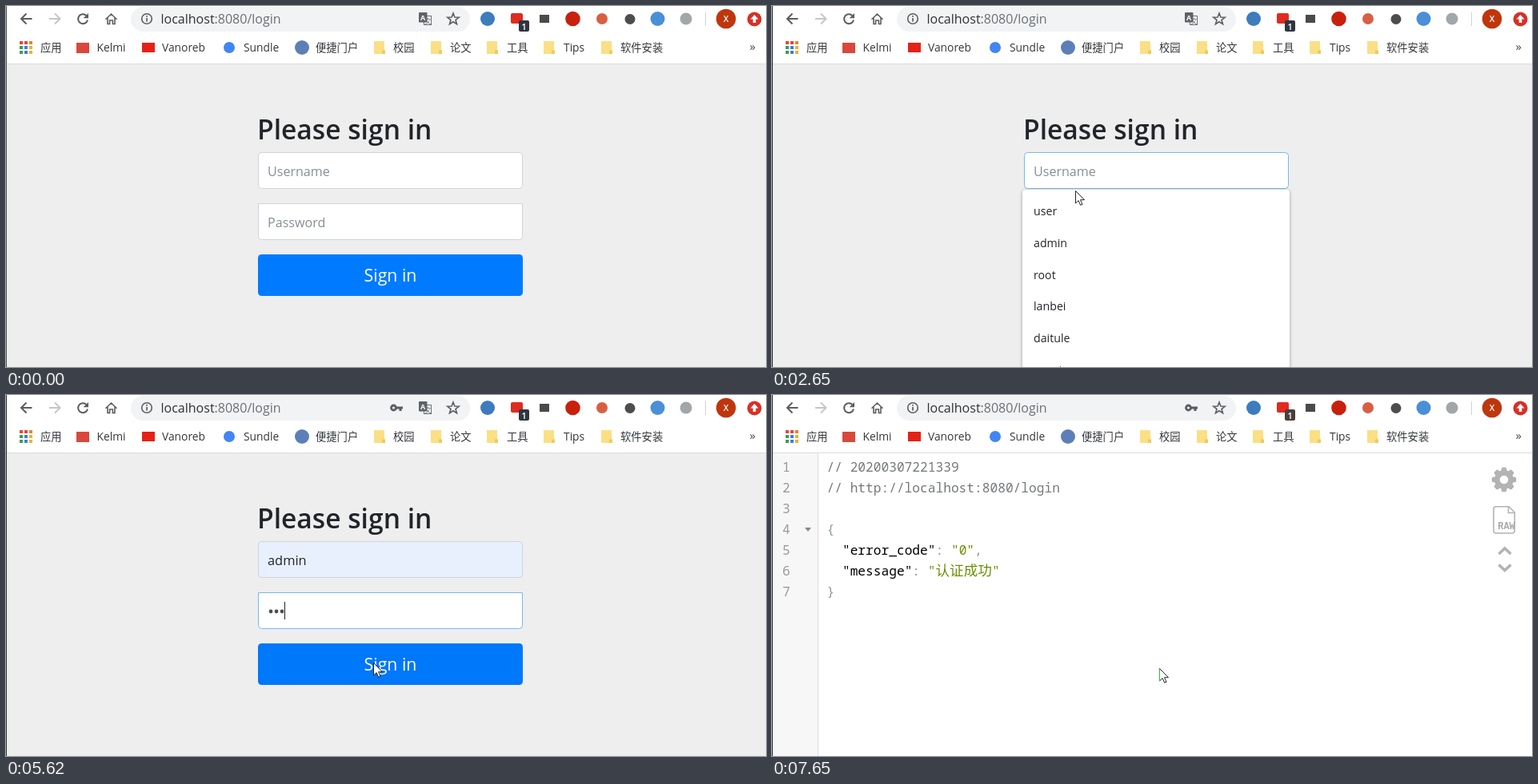
Recreate the animation shown at these times as an HTML page. Size 950 by 452 pixels, loop 8000 ms.

```html
<!DOCTYPE html>
<html lang="zh-CN">
<head>
<meta charset="utf-8">
<title>Sign in</title>
<style>
html, body { margin: 0; width: 100%; height: 100%; overflow: hidden; background: #fff; }
svg { display: block; }
text { font-family: "Open Sans", "Noto Sans CJK SC", "Noto Sans CJK JP", sans-serif; white-space: pre; }
.icon { fill: none; stroke: #5a5e63; stroke-width: 2; }
.thin { stroke-width: 1.6; }
.cjk { font-size: 13.3px; fill: #33363a; }
.mark { font-size: 13.8px; fill: #33363a; }
.hint { font-size: 16.1px; fill: #868e96; }
.item { font-size: 14.2px; fill: #212529; }
.code { font: 16.2px "Noto Sans Mono", "DejaVu Sans Mono", "Noto Sans CJK SC", monospace; }
.caret { fill: #222; }
#list { filter: drop-shadow(0 1px 2px rgba(0,0,0,.35)); }
</style>
</head>
<body>
<svg id="stage" width="950" height="452" viewBox="0 0 950 452">
  <rect width="950" height="452" fill="#fff"/>

  <g id="form">
    <rect y="73" width="950" height="379" fill="#eee"/>
    <text x="314" y="167" font-size="33.6" font-weight="600" fill="#212529">Please sign in</text>
    <rect id="userBox" x="315.5" y="183.5" width="330" height="45" rx="4"/>
    <text id="userHint" class="hint" x="327" y="213">Username</text>
    <text id="preview" x="327" y="213" font-size="14.7" fill="#222" style="font-family:'Liberation Sans',sans-serif"></text>
    <text id="userText" x="327" y="213" font-size="16.4" fill="#212529">admin</text>
    <rect id="userCaret" class="caret" x="327" y="195" width="1" height="22"/>
    <path id="passBox" d="M315.5 247.5H645.5V288.5a4 4 0 0 1-4 4H319.5a4 4 0 0 1-4-4z" fill="#fff"/>
    <text id="passHint" class="hint" x="327" y="277">Password</text>
    <g id="dots" fill="#495057"></g>
    <rect id="passCaret" class="caret" y="259" width="1" height="22"/>
    <rect id="ring" x="311.8" y="307.8" width="337.4" height="58.4" rx="7" fill="#007bff"/>
    <rect id="button" x="315" y="311" width="331" height="52" rx="4.5"/>
    <text x="480.5" y="345" font-size="21.3" fill="#fff" text-anchor="middle">Sign in</text>
    <g id="list">
      <path d="M313 460V234a4 4 0 0 1 4-4H643a4 4 0 0 1 4 4V460z" fill="#fff"/>
      <rect id="hover" x="314" width="333" height="40" fill="#dadce0"/>
      <g id="items"></g>
    </g>
    <g id="tip">
      <rect x="414.5" y="283.5" width="110" height="28" fill="#fff" stroke="#5a5555"/>
      <text x="422" y="303" font-size="13" fill="#000">请填写此字段。</text>
    </g>
  </g>

  <g id="result">
    <rect y="73" width="57" height="379" fill="#f7f7f7"/>
    <rect x="57" y="73" width="1" height="379" fill="#ddd"/>
    <g id="json">
      <g id="lines"></g>
      <path id="fold" d="M41 166h8l-4 5z" fill="#888"/>
      <g id="gear" transform="translate(915 106)" fill="#b3b3b3">
        <circle r="8.5" fill="none" stroke="#b3b3b3" stroke-width="6.5"/>
      </g>
      <g fill="none" stroke="#b3b3b3">
        <path d="M905 139.7H921L928.3 147V170a3 3 0 0 1-3 3H905a3 3 0 0 1-3-3V142.7a3 3 0 0 1 3-3zM920.5 140v7.5H928" stroke-width="1.6"/>
        <path d="M908.5 199l7.5-7 7.5 7M908.5 212.5l7.5 7 7.5-7" stroke-width="3.6"/>
      </g>
      <text x="918" y="168" font-size="12" font-weight="700" fill="#aaa" text-anchor="middle" style="font-family:'Liberation Mono',monospace">RAW</text>
    </g>
  </g>

  <g id="toolbar">
    <rect width="950" height="72" fill="#fff"/>
    <rect y="72" width="950" height="1" fill="#dcdcdc"/>
    <rect x="156" y="1" width="424" height="31" rx="15.5" fill="#f1f3f4"/>
    <path class="icon" d="M32.5 16H19.5M25.5 9.5L19 16l6.5 6.5"/>
    <path class="icon" d="M54 16H67M61 9.5l6.5 6.5-6.5 6.5" style="stroke:#c4c6c8"/>
    <g id="reload">
      <path class="icon" d="M100.5 12A6 6 0 1 0 102 17.5"/>
      <path d="M103 9v6.3h-6.3z" fill="#5a5e63"/>
    </g>
    <path id="stop" class="icon" d="M90.5 10.5l11 11M101.5 10.5l-11 11" style="stroke:#3f6655"/>
    <path class="icon thin" d="M124.5 16.8L131.5 10l7 6.8M127 15V22.5h2.6V18h3.8V22.5H136V15"/>
    <circle class="icon thin" cx="176" cy="16" r="6.3"/>
    <path d="M175.2 15h1.7v4.5h-1.7zM175.2 12h1.7v1.7h-1.7z" fill="#5a5e63"/>
    <text x="193.5" y="22" font-size="16" fill="#2f3236">localhost<tspan fill="#6b6f74">:8080/login</tspan></text>
    <g id="translate">
      <rect x="522.5" y="12.5" width="9" height="11" fill="#fff" stroke="#6b6f74"/>
      <text x="527.5" y="21.5" font-size="8" fill="#5a5e63" text-anchor="middle">文</text>
      <rect x="516" y="8" width="10.5" height="12.5" rx="1" fill="#5f6368"/>
      <text x="521.2" y="18" font-size="9" font-weight="700" fill="#fff" text-anchor="middle">A</text>
    </g>
    <g id="key">
      <circle class="icon" cx="4.5" cy="16" r="3" style="stroke-width:2.8"/>
      <path d="M8 14.5H16V17.5H14.5V20H11.5V17.5H8z" fill="#5a5e63"/>
    </g>
    <path id="star" class="icon thin"/>
    <circle cx="602" cy="16" r="9" fill="#3d7cbd"/>
    <rect x="631" y="9" width="15" height="13" rx="2" fill="#e02b20"/>
    <rect id="badge" x="641" y="18" width="13" height="14" rx="2"/>
    <text x="647.5" y="29.5" font-size="11.5" font-weight="600" fill="#fff" text-anchor="middle">1</text>
    <rect x="667" y="11" width="12" height="10" fill="#4a4a4a"/>
    <circle cx="708.5" cy="16" r="9.3" fill="#c9200d"/>
    <circle cx="745" cy="16" r="7" fill="#d95f43"/>
    <circle cx="780" cy="16.5" r="6.5" fill="#4d4d4d"/>
    <circle cx="814.5" cy="16" r="9" fill="#4b8fd6"/>
    <circle cx="850" cy="16" r="7.5" fill="#a3a6a9"/>
    <rect x="874" y="8" width="1" height="17" fill="#cfd1d3"/>
    <circle cx="900" cy="16" r="12.3" fill="#bf360c"/>
    <text x="900" y="20" font-size="10.5" font-weight="600" fill="#fff" text-anchor="middle">X</text>
    <circle cx="935.5" cy="16.5" r="9" fill="#d93025"/>
    <path d="M935.5 11l5 5.5h-3.2V21h-3.6V16.5h-3.2z" fill="#fff"/>
    <g id="apps"></g>
    <rect x="88" y="46" width="16" height="13" fill="#d9483b"/>
    <rect x="170" y="46" width="16" height="12" fill="#e62117"/>
    <circle cx="279" cy="52" r="7" fill="#4285f4"/>
    <circle cx="370" cy="52" r="9" fill="#5c7fb8"/>
    <g id="marks"></g>
    <text x="929.5" y="56" font-size="15" fill="#44474a">»</text>
  </g>

  <rect id="edge" width="1" height="452"/>
  <g id="cursor">
    <g id="arrow">
      <path d="M.5.5V16l3.6-3.4 2.5 5.7 2.4-1-2.5-5.6h5z" fill="#fff" stroke="#222"/>
      <path id="glint" d="M.5 1V16" stroke="#22c322"/>
    </g>
    <path id="beam" d="M-3-6.5h2.5l.5.5.5-.5H3M-3 6.5h2.5L0 6l.5.5H3M0-6V6" fill="none" stroke="#111"/>
  </g>
</svg>
<script>
const $ = id => document.getElementById(id);
const add = (id, markup) => $(id).insertAdjacentHTML('beforeend', markup);
const label = (x, y, text, cls, extra = '') =>
  `<text class="${cls}" x="${x}" y="${y}" ${extra}>${text}</text>`;

// Bookmarks bar
const dotColors = ['#e0493c', '#e0493c', '#e8842c', '#3a9d57', '#3f7de0', '#eab52e', '#3a9d57', '#3f7de0', '#eab52e'];
dotColors.forEach((c, i) =>
  add('apps', `<rect x="${17 + i % 3 * 6}" y="${44 + Math.floor(i / 3) * 6}" width="4" height="4" fill="${c}"/>`));
[[43, '应用'], [387, '便捷门户'], [484, '校园'], [555, '论文'], [626, '工具'], [768, '软件安装']]
  .forEach(([x, s]) => add('marks', label(x, 57, s, 'cjk')));
[[113.5, 'Kelmi'], [195, 'Vanoreb'], [297, 'Sundle'], [697, 'Tips']]
  .forEach(([x, s]) => add('marks', label(x, 57, s, 'mark')));
[460, 531, 601, 672, 744].forEach(x => add('marks',
  `<path d="M${x} 44h13v11.5h1v4.5h-14z" fill="#fbdf85"/><path d="M${x + 10} 60v-4.5h4v4.5z" fill="#f0c95c"/>`));

const starPoints = Array.from({ length: 10 }, (_, i) => {
  const r = i % 2 ? 3.2 : 7.6, a = i * Math.PI / 5;
  return (559 + r * Math.sin(a)).toFixed(1) + ' ' + (16.6 - r * Math.cos(a)).toFixed(1);
});
$('star').setAttribute('d', 'M' + starPoints.join('L') + 'z');

// Suggestions and password dots
const names = ['user', 'admin', 'root', 'lanbei', 'daitule', 'guest'];
names.forEach((s, i) => add('items', label(327, 262 + Math.round(i * 39.8), s, 'item')));
for (let i = 0; i < 3; i++) add('dots', `<circle cx="${331 + i * 7}" cy="271" r="2.4"/>`);

// JSON viewer
const span = (color, s) => `<tspan fill="${color}">${s}</tspan>`;
const note = s => span('#75797c', s), sign = s => span('#859a9a', s);
const name = s => span('#000', `"${s}"`), value = s => span('#6b8e00', `"${s}"`);
const rows = [
  note('// 20200307221339'),
  note('// http://localhost:8080/login'),
  '',
  sign('{'),
  '  ' + name('error_code') + sign(': ') + value('0') + sign(','),
  '  ' + name('message') + sign(': ') + value('<tspan font-size="17.6" font-weight="300">认证成功</tspan>'),
  sign('}')
];
rows.forEach((row, i) => {
  add('lines', label(13, 96 + i * 26, i + 1, 'code', 'fill="#999"'));
  add('lines', label(68.5, 96 + i * 26, row, 'code'));
});
for (let a = 0; a < 360; a += 45)
  add('gear', `<path d="M-4-10l1.3-5.2h5.4L4-10z" transform="rotate(${a})"/>`);

// Step tables: [start, ...values]
const path = [
  [70, 834, 436], [150, 765, 402], [230, 658, 345], [310, 545, 288],
  [390, 455, 250], [470, 405, 232], [550, 387, 224],
  [2570, 383, 226], [2650, 379, 231], [2730, 376, 250], [2800, 371, 280],
  [2880, 368, 292], [3280, 367, 294],
  [3670, 372, 290], [3750, 385, 281], [3830, 400, 273], [3910, 409, 270],
  [5540, 427, 294], [5620, 459, 335], [5700, 476, 350], [5780, 483, 351],
  [5860, 485, 345], [5940, 484, 342]
];
const userFocus = [[0, 0], [870, .5], [940, 1], [3980, .6], [4060, .2], [4130, 0]];
const passFocus = [[0, 0], [3980, .4], [4060, .8], [4130, 1], [6080, .6], [6160, .2], [6250, 0]];
const pressed = [[0, 0], [5620, .14], [5700, .65], [5780, 1]];
const ringGlow = [[0, 0], [6080, .2], [6160, .4], [6250, .5]];
const typed = [[0, 0], [5000, 1], [5160, 2], [5390, 3]];

const at = (table, t) => table.filter(row => row[0] <= t).pop();
const level = (table, t) => at(table, t)[1];
const within = (t, ...spans) => spans.some(([a, b]) => t >= a && t < b);
const show = (id, on) => { $(id).style.display = on ? '' : 'none'; };
const set = (id, key, v) => $(id).setAttribute(key, v);
const mix = (a, b, k) => `rgb(${a.map((v, i) => Math.round(v + (b[i] - v) * k))})`;
const grey = [206, 212, 218], focus = [118, 184, 245];

function draw(t) {
  const [, x, y] = at(path, t) || [0, -50, -50];
  const open = within(t, [940, 3370]);
  const done = t >= 6960;
  const row = open && y >= 238 ? Math.floor((y - 238) / 40) : -1;
  const filled = t >= 3440;
  const ghost = within(t, [3370, 3440]) ? 'admin' : row >= 0 ? names[row] : '';

  show('form', !done);
  show('result', done);
  show('json', t >= 7270);
  show('fold', t >= 7650);

  set('userBox', 'fill', filled || ghost ? '#e8f0fe' : '#fff');
  set('userBox', 'stroke', mix(grey, focus, level(userFocus, t)));
  set('passBox', 'stroke', mix(grey, focus, level(passFocus, t)));
  show('userHint', !filled && !ghost);
  show('userText', filled);
  $('preview').textContent = ghost;
  show('userCaret', within(t, [700, 1250], [1790, 2340], [2880, 3370]));
  show('list', open);
  show('hover', row >= 0);
  set('hover', 'y', 238 + row * 40);
  show('tip', within(t, [3910, 3980]));

  const count = level(typed, t);
  show('passHint', !count);
  [...$('dots').children].forEach((dot, i) => { dot.style.display = i < count ? '' : 'none'; });
  set('passCaret', 'x', 327 + count * 7);
  show('passCaret', within(t, [3980, 4530], [5000, 5940]));

  set('button', 'fill', mix([0, 123, 255], [0, 105, 217], level(pressed, t)));
  set('ring', 'opacity', level(ringGlow, t));

  const loading = within(t, [6080, 6960]);
  show('reload', !loading);
  show('stop', loading);
  show('key', t >= 5000);
  show('translate', t < 6400);
  set('key', 'transform', `translate(${t < 6400 ? 480 : 516} 0)`);
  set('badge', 'fill', t < 6480 ? '#2e3640' : '#4a3f3d');
  set('edge', 'fill', t < 700 ? '#48585c' : '#2b393b');

  const inField = !done && x > 315 && x < 646 &&
    (y > 183 && y < 229 || !open && y > 247 && y < 293);
  show('cursor', t >= 70 && !within(t, [5000, 5540]));
  show('beam', inField);
  show('arrow', !inField);
  show('glint', done);
  set('cursor', 'transform', `translate(${inField ? x + .5 : x} ${y})`);
}

const start = performance.now();
function tick() {
  draw((performance.now() - start) % 8000);
  requestAnimationFrame(tick);
}
tick();
</script>
</body>
</html>
```
